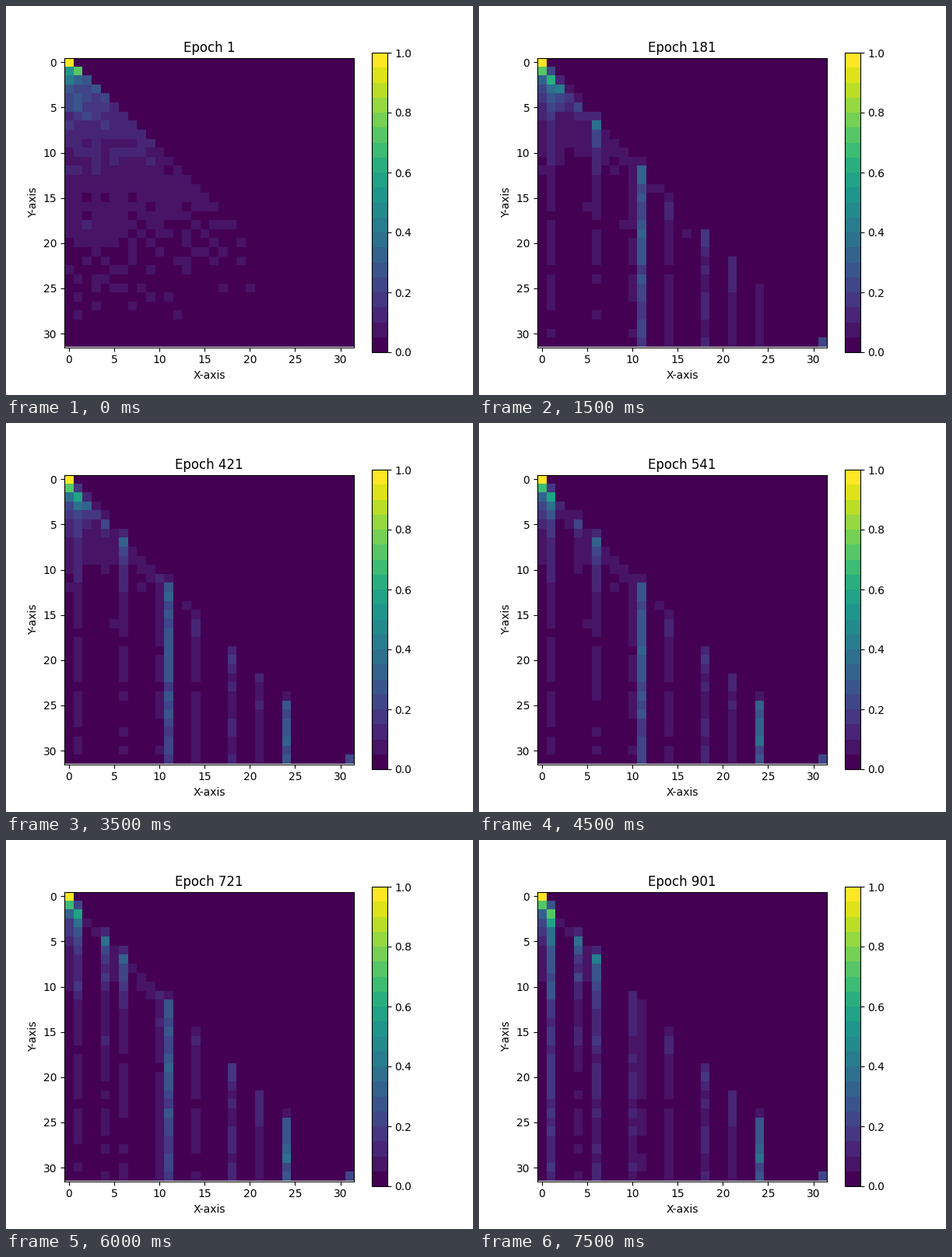
Recreate the animation shown at these times as a matplotlib script. Size 600 by 500 pixels, loop 8 s.

```python
import numpy as np
import matplotlib.pyplot as plt
from matplotlib.animation import FuncAnimation

SIZE, LEVELS, FRAMES = 32, 20, 16

# Columns that draw attention:
# column, strength before and after, falloff before and after, frame of the shift
ANCHORS = [
    (0, 14.5, 14.3, 1.05, 1.15, 8),
    (1, 11.5, 14.5, 0.75, 0.5, 13.5),
    (2, 8, 1.2, 0.95, 1, 8),
    (3, 3.6, 1.2, 0.7, 0.7, 8),
    (4, 3.6, 7, 0.7, 0.6, 10.5),
    (6, 6.5, 7.5, 0.65, 0.45, 13),
    (10, 2.2, 3, 0.25, 0.2, 12),
    (11, 5.8, 1.7, 0.1, 0.2, 13.5),
    (14, 2.2, 2, 0.2, 0.2, 8),
    (18, 2.7, 2.7, 0.1, 0.1, 8),
    (21, 2.3, 2.3, 0.15, 0.15, 8),
    (24, 1.6, 6, 0, 0, 6),
]

rng = np.random.default_rng(4)
rows, cols = np.mgrid[:SIZE, :SIZE]
dist = np.maximum(rows - cols, 1)
causal = cols <= rows
noise = rng.normal(size=(SIZE, SIZE)) * np.minimum(rows / 10, 1)
phase = rng.uniform(0, 2 * np.pi, (SIZE, SIZE))

# Untrained: each row shares its weight almost evenly
untrained = 21 / (rows + 1) * (1.1 - 0.25 * cols / (rows + 1))
untrained *= np.exp(0.2 * rng.normal(size=(SIZE, SIZE)))


def shift(n, mid, width=4):
    s = np.clip((n - mid) / width + 0.5, 0, 1)
    return s * s * (3 - 2 * s)


def trained(n):
    """Weak haze that fades with time, crossed by the anchor columns."""
    field = 3.2 / (1 + cols / 8) * dist ** -0.3 * (1 - 0.4 * n / FRAMES)
    for c, amp0, amp1, fall0, fall1, mid in ANCHORS:
        s = shift(n, mid)
        amp = amp0 + (amp1 - amp0) * s
        fall = fall0 + (fall1 - fall0) * s
        field[:, c] = amp * dist[:, c] ** -fall
    field *= np.exp(0.17 * noise + 0.04 * np.sin(phase + 0.6 * n))
    field[rows == cols] *= 0.35
    field[-1, -1] = 4.5
    return field


def matrix(n):
    start = np.exp(-2 * n)
    field = start * untrained + (1 - start) * trained(n)
    field[0, 0] = LEVELS
    return np.where(causal, field, 0) / LEVELS


fig, ax = plt.subplots(figsize=(6, 5), dpi=100)
im = ax.imshow(matrix(0), cmap=plt.get_cmap("viridis", LEVELS), vmin=0, vmax=1)
fig.colorbar(im, ax=ax)
ax.set_xlabel("X-axis")
ax.set_ylabel("Y-axis")
title = ax.set_title("Epoch 1", pad=5.5)


def update(n):
    im.set_data(matrix(n))
    title.set_text(f"Epoch {1 + 60 * n}")
    return im, title


anim = FuncAnimation(fig, update, frames=FRAMES, interval=500, repeat=True,
                     repeat_delay=0)
plt.show()
```
